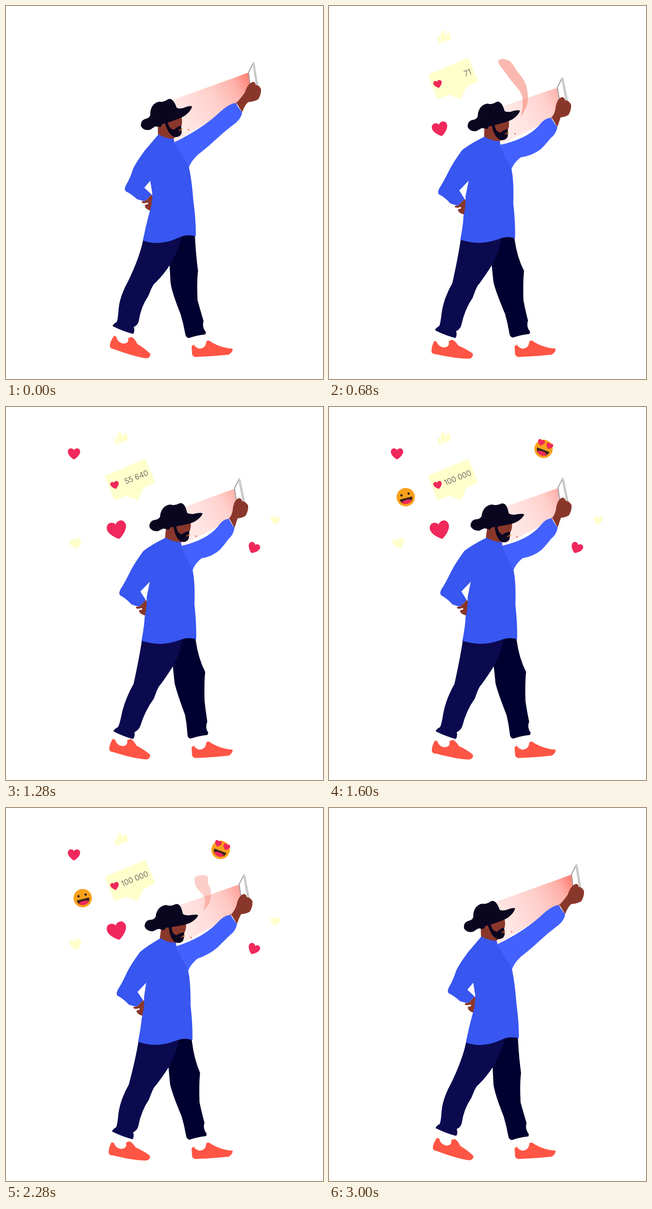
These frames come from a looping animation (690 by 811 pixels, 3.4 s). An HTML page:

```html
<!DOCTYPE html>
<html lang="en">
<head>
<meta charset="utf-8">
<title>Selfie walk</title>
<style>
  html, body { margin: 0; width: 100%; height: 100%; overflow: hidden; background: #fff; }
  svg { display: block; width: 690px; height: 811px; }
  .pop { transform-box: fill-box; transform-origin: center; transform: scale(0); }
  .red { fill: #f0285c; }
  .pale { fill: #ffffcc; }
  .skin { fill: #8a372b; }
  .ink { fill: #0b0620; }
  .shirt { fill: #3856f0; }
  .shoe { fill: #ff5545; }
  .face { fill: #f9a11b; }
  .dark { fill: #3b2420; }
  #glow stop { stop-color: #ff5545; }
  #count { font: 300 16.5px Inter, Lato, sans-serif; fill: #444; text-anchor: end; white-space: pre; }
</style>
</head>
<body>
<svg viewBox="0 0 690 811">
  <defs>
    <path id="heart" d="M0 18C-3 17-20 5-20-7C-20-14-15-18-10-18C-5-18-1-15 0-12C1-15 5-18 10-18C15-18 20-14 20-7C20 5 3 17 0 18Z"/>
    <g id="smile">
      <circle class="face" r="20"/>
      <path class="dark" d="M-14 2H14C14 19-14 19-14 2Z"/>
      <path class="red" d="M-11 9C-5 5 5 5 11 9C7 17-7 17-11 9Z"/>
    </g>
    <linearGradient id="glow" gradientUnits="userSpaceOnUse" x1="531" y1="158" x2="375" y2="245">
      <stop offset="0" stop-opacity=".75"/>
      <stop offset=".2" stop-opacity=".45"/>
      <stop offset=".5" stop-opacity=".28"/>
      <stop offset="1" stop-opacity=".13"/>
    </linearGradient>
  </defs>

  <g class="pop" data-at="160">
    <path class="pale" d="M219 148L300 114Q303 113 305 116L323 160Q325 163 322 165L299 176L287 203L262 193L240 202Q237 203 235 200L216 153Q215 150 219 148Z"/>
    <use href="#heart" class="red" transform="translate(237 170) rotate(-15) scale(.46)"/>
    <text id="count" transform="translate(311 147.5) rotate(-22)"></text>
  </g>
  <g class="pop pale" data-at="440">
    <path d="M235 69L241 66L246 80L240 83Z"/>
    <path d="M242 66L246 54Q249 52 250 54L252 62L262 57Q265 64 265 72L247 79Z"/>
  </g>
  <g class="pop red" data-at="600"><use href="#heart" transform="translate(242 268) rotate(-14) scale(1.06)"/></g>
  <g class="pop pale" data-at="760"><use href="#heart" transform="translate(586 247) rotate(3) scale(.5)"/></g>
  <g class="pop red" data-at="980"><use href="#heart" transform="translate(148 102) scale(.67)"/></g>
  <g class="pop pale" data-at="1000"><use href="#heart" transform="translate(152 297) rotate(-15) scale(.63)"/></g>
  <g class="pop red" data-at="1020"><use href="#heart" transform="translate(539 307) rotate(24) scale(.64)"/></g>
  <g class="pop" data-at="1360">
    <g transform="translate(167 196) rotate(-14)">
      <use href="#smile"/>
      <circle class="dark" cx="-8" cy="-6" r="2.6"/>
      <circle class="dark" cx="8" cy="-6" r="2.6"/>
    </g>
  </g>
  <g class="pop" data-at="1480">
    <g transform="translate(467 91) rotate(20)">
      <use href="#smile"/>
      <use href="#heart" class="red" transform="translate(-9.5 -11) scale(.38)"/>
      <use href="#heart" class="red" transform="translate(10 -10) scale(.38)"/>
    </g>
  </g>

  <path id="beam" class="bend" fill="url(#glow)" d="M527,145L533,172L505,213L367,296L358,206Z"/>
  <path id="smoke" fill="#f4705f"/>
  <path class="bend" d="M538,124L528,144L531,170L545,172Z" fill="#fff" stroke="#999" stroke-width="2"/>
  <path class="bend" d="M536,124L541,124L549,172L544,172Z" fill="#c9c9c9"/>
  <path class="bend skin" d="M500,208L514,231Q520,215 527,209Q540,208 549,203Q556,192 555,180Q549,170 543,172Q543,165 538,165Q526,168 520,188Q512,200 500,212Z"/>
  <path class="bend skin" d="M317,410L303,424Q294,423 296,428Q303,430 308,427L310,430L302,433Q302,441 314,445Q322,430 319,412Z"/>
  <g id="head">
    <path class="skin" d="M330,255L382,240Q385,256 381,262L380,275L362,291L331,283Z"/>
    <path class="ink" d="M346,248L351,248Q354,268 366,269Q373,262 381,260Q383,270 382,277Q378,286 368,285Q354,282 346,255Z"/>
    <path d="M376 272L383 267" stroke="#8a372b" stroke-width="3"/>
    <path d="M380 269L384 267" stroke="#f2a63c" stroke-width="1.5"/>
    <circle cx="397.5" cy="269" r="1.5" fill="#f0503f"/>
    <path class="ink" d="M294,262Q300,272 314,269Q326,260 327,262L337,263L340,257Q378,246 390,238Q402,229 405,219Q404,215 385,222Q372,224 371,220Q363,198 352,203Q343,210 333,208Q316,212 314,232Q316,243 302,246Q292,250 294,262Z"/>
  </g>
  <path class="bend" fill="#010131" d="M378,492L411,495Q413,540 418,576Q415,600 417,640Q424,665 430,685Q426,698 435,709L434,714Q415,716 398,722Q391,721 390,712Q386,690 380,670Q360,620 358,600L356,562Z"/>
  <path class="bend" fill="#0b0a4f" d="M300,500Q294,540 266,598Q247,632 245,660Q243,690 239,688Q233,692 232,696Q254,707 277,713Q281,707 278,698Q287,694 289,685Q293,655 310,630Q320,604 325,602Q345,582 358,561Q378,525 383,500Z"/>
  <path class="bend shirt" d="M332,279Q345,288 365,289L367,297L400,345L398,350Q404,375 408,425Q414,470 413,501Q395,495 375,504Q335,523 298,510Q305,475 312,450Q320,425 318,405L314,380L318,300Z"/>
  <path class="bend shirt" d="M332,279Q316,298 303,313Q285,337 277,353Q270,375 262,388Q254,402 265,405Q278,413 285,420Q294,423 303,424L317,410L301,395L314,380L345,300Z"/>
  <path class="bend" fill="#4361ff" d="M365,297Q425,268 462,234Q485,212 500,211Q507,223 514,231Q512,246 495,258Q475,273 458,289Q440,306 418,323Q403,337 398,351Q385,325 365,297Z"/>
  <path id="heelShoe" class="shoe" d="M235,717Q226,730 226,740Q227,745 235,746Q280,763 305,766Q315,765 314,756Q300,743 286,735Q278,719 272,720L266,722Q268,734 255,734Q243,732 240,719Z"/>
  <path class="shoe" d="M404,740L405,757Q407,764 415,763Q450,762 485,758Q495,751 493,745Q470,744 447,731Q442,725 436,729Q435,745 420,745Q411,742 409,736Z"/>
</svg>

<script>
const LOOP = 3400, LAST = 3000, STEP = 40;
const $ = id => document.getElementById(id);
const clamp = v => Math.max(0, Math.min(1, v));
const mix = (a, b, k) => a + (b - a) * k;
const span = (t, from, to) => clamp((t - from) / (to - from));
const smooth = k => k * k * (3 - 2 * k);

// Joints of the figure: where each rests, and how far it shifts when the arm is drawn in
const armJoints = {
  phone: [535, 150, -31, 33], hand: [540, 190, -28, 34], cuff: [507, 221, -17, 32],
  forearm: [440, 270, 3, 22], brim: [360, 206, 15, 13]
};
const bodyJoints = {
  neck: [345, 284, 5, 5], armpit: [398, 350, -3, 4], shoulder: [303, 318, -15, 0],
  elbow: [262, 396, -23, 7], wrist: [306, 412, -24, 10], side: [314, 380, -12, 0],
  hemBack: [298, 510, -14, -2], hemFront: [413, 501, -10, 4], crotch: [356, 562, -4, 0],
  nearKnee: [290, 620, 1, 4], nearAnkle: [255, 705, -2, 9],
  farKnee: [410, 600, 5, 0], farAnkle: [415, 716, 2, -1]
};
const joints = [...Object.values(armJoints), ...Object.values(bodyJoints)];
const armCount = Object.keys(armJoints).length;

// Hips and shoulders sway; feet and raised hand stay put
const swayShare = (x, y) => clamp((735 - y) / 90) * (y > 345 ? 1 : clamp((500 - x) / 95));

// Moves a point with its nearest joints
function bend(x, y, { arm, lean, sway }) {
  let dx = 0, dy = 0, total = 0;
  joints.forEach(([jx, jy, mx, my], i) => {
    const w = ((x - jx) ** 2 + (y - jy) ** 2 + 1) ** -2;
    const k = w * (i < armCount ? arm : lean);
    dx += mx * k;
    dy += my * k;
    total += w;
  });
  x += dx / total;
  y += dy / total;
  return [x + sway * swayShare(x, y), y];
}

function poseAt(t) {
  const drawn = smooth(span(t, 0, 400)), back = span(t, 1280, LAST);
  return {
    arm: drawn - back ** 2,
    lean: drawn - back ** 3,
    sway: 11 * (t < 1280 ? span(t, 400, 1280) ** 1.5 : (1 - span(t, 1280, 2640)) ** 2),
    nod: 11 * (span(t, 0, 1880) - span(t, 1880, LAST) ** 2)
  };
}

// Each plume grows until "ripe", then drifts from one state to the other and fades
const plumes = [
  { start: 80, ripe: 400, old: 960, gone: 1160,
    from: { x: 413, foot: 262, top: 141, tilt: 0, alpha: .5 },
    to: { x: 422, foot: 220, top: 88, tilt: -60, alpha: .48 } },
  { start: 1640, ripe: 1880, old: 2640, gone: 2800,
    from: { x: 420, foot: 268, top: 175, tilt: 32, alpha: .5 },
    to: { x: 436, foot: 184, top: 119, tilt: -11, alpha: .2 } }
];

function drawSmoke(t) {
  const plume = plumes.find(p => t > p.start && t < p.gone);
  $('smoke').style.display = plume ? '' : 'none';
  if (!plume) return;
  const { start, ripe, old, gone, from, to } = plume;
  const age = span(t, ripe, old), grow = span(t, start, ripe);
  const now = key => mix(from[key], to[key], age);
  const left = [], right = [], n = 40;
  for (let i = 0; i <= n; i++) {
    const s = i / n;
    const x = now('x') + grow * (mix(14, 7, age) * Math.sin(mix(4, 6, age) * s) + now('tilt') * s ** mix(2, 4, age));
    const y = mix(now('foot'), now('top'), s * grow);
    const cap = Math.sqrt(1 - span(s, .84, 1) ** 2);
    const half = grow * cap * mix(18, 21, age) * s ** mix(1.4, .5, age) * (1 + .13 * Math.sin(13 * s));
    left.push(`${x - half},${y}`);
    right.unshift(`${x + half},${y}`);
  }
  $('smoke').setAttribute('d', `M${[...left, ...right].join('L')}Z`);
  $('smoke').setAttribute('opacity', now('alpha') * (1 - span(t, old, gone)));
}

function likes(t) {
  if (t < 360) return '';
  const n = t < 960 ? 5000 ** span(t, 400, 960)
    : t < 1280 ? mix(5000, 55640, span(t, 960, 1280))
    : mix(55640, 100000, span(t, 1280, 1560));
  return String(Math.round(n)).replace(/\B(?=(\d{3})+$)/g, ' ');
}

const pops = [...document.querySelectorAll('.pop')];
const limbs = [...document.querySelectorAll('.bend')].map(el => ({ el, rest: el.getAttribute('d') }));

function draw(t) {
  const pose = poseAt(t);
  for (const { el, rest } of limbs) {
    el.setAttribute('d', rest.replace(/(\d+),(\d+)/g, (_, x, y) => bend(+x, +y, pose).map(v => v.toFixed(2))));
  }
  const [neckX, neckY] = bend(345, 275, pose);
  $('head').setAttribute('transform',
    `translate(${neckX - 345} ${neckY - 275}) rotate(${pose.nod} 345 275)`);
  $('heelShoe').setAttribute('transform', `rotate(${.55 * pose.sway - 9.5 * pose.lean} 310 764)`);
  $('glow').setAttribute('gradientTransform', `translate(${-30 * pose.arm} ${33 * pose.arm})`);
  $('beam').setAttribute('opacity', 1 - .4 * pose.arm);
  drawSmoke(t);
  $('count').textContent = likes(t);
  for (const el of pops) {
    const at = +el.dataset.at;
    el.style.transform = `scale(${Math.min(span(t, at, at + 100), 1 - span(t, 2320, 2480))})`;
  }
}

let shown = -1;
function tick() {
  const t = Math.min(LAST, Math.floor(performance.now() % LOOP / STEP) * STEP);
  if (t !== shown) draw(shown = t);
  requestAnimationFrame(tick);
}
tick();
</script>
</body>
</html>
```
